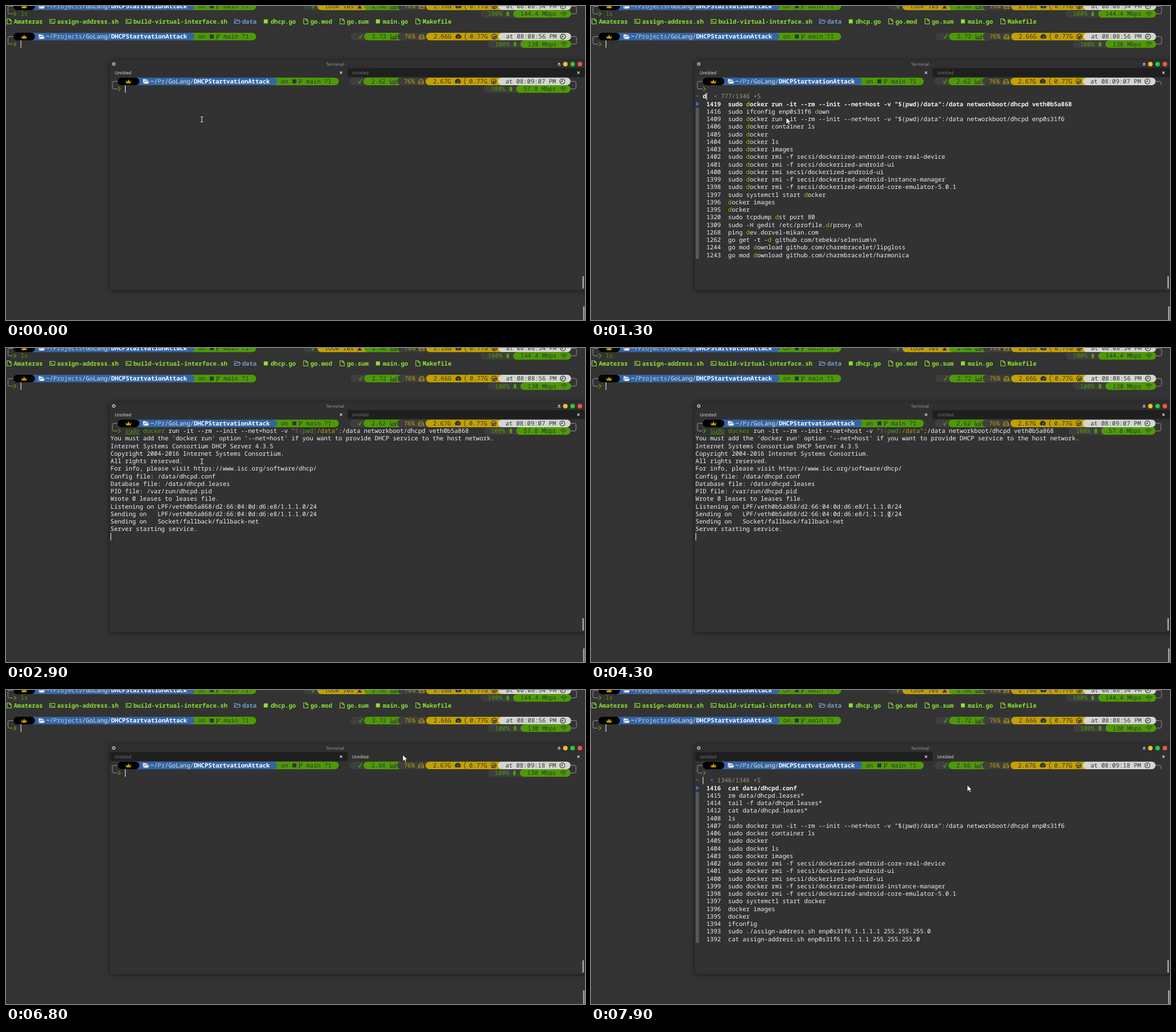
An HTML page for the animation above (8 s loop, 1017 by 551 pixels).

```html
<!DOCTYPE html>
<html lang="en">
<head>
<meta charset="utf-8">
<title>Terminal</title>
<style>
html, body { margin: 0; width: 100%; height: 100%; overflow: hidden; background: #333; }
svg { display: block; width: 1017px; height: 551px; }
text { font: 10.605px "Noto Sans Mono", "DejaVu Sans Mono", monospace; fill: #f2f2f2; white-space: pre; text-rendering: geometricPrecision; }
.ui { font: 7.7px "Noto Sans", "Open Sans", sans-serif; }
.b { font-weight: 700; }
.u { text-decoration: underline; }
</style>
</head>
<body>
<svg id="stage" viewBox="0 0 1017 551"></svg>
<script>
const CW = 6.363, RH = 13.25, LOOP = 8000;
const GREEN = '#4e9a06', GOLD = '#c4a000', BLUE = '#3465a4', DARK = '#2e3436',
      GREY = '#3e3e3e', PALE = '#d3d7cf', LIME = '#8ae234', SKY = '#729fcf', LINE = '#949494';

// Drawing helpers; rows and columns are terminal cells.
const text = (col, row, str, fill = '#f2f2f2', cls = '') =>
  `<text x="${col * CW}" y="${row * RH + 10.3}" style="fill:${fill}" class="${cls}">${str}</text>`;
const span = (str, fill, cls = '') => `<tspan style="fill:${fill}" class="${cls}">${str}</tspan>`;
const rect = (x, y, w, h, fill, rx = 0) =>
  `<rect x="${x}" y="${y}" width="${w}" height="${h}" rx="${rx}" fill="${fill}"/>`;
const pill = (x1, x2, row, fill) => rect(x1, row * RH, x2 - x1, RH, fill, 6.6);
const line = (d, stroke = LINE, width = 1) =>
  `<path d="${d}" fill="none" stroke="${stroke}" stroke-width="${width}"/>`;
const caret = (col, row) => rect(col * CW, row * RH, 1, RH, '#fff');
const group = (x, y, body, id = '') => `<g ${id && `id="${id}"`} transform="translate(${x} ${y})">${body}</g>`;
const layer = (id, body) => `<g id="${id}">${body}</g>`;

const solid = {
  crown: 'M-5-2L-2.5 1L0-3.5L2.5 1L5-2L4 3.5H-4Z',
  folder: 'M-5.5 4V-4H-2L-1-3H3V-1H-3ZM-4.8 4L-2.5 0H5.5L3.5 4Z',
  glass: 'M-4.5 4H4.5L1.5 0L3-4H-3L-1.5 0Z',
  gauge: 'M-4 3.5A5 5 0 1 1 4 3.5ZM0 2L2.5-2L-1 1Z',
  battery: 'M-2-3H-1V-4.5H1V-3H2.3V4H-2.3V-3Z',
  square: 'M-3.5-3.5H3.5V3.5H-3.5Z'
};
const outline = {
  branch: 'M-2-4V4M2-4V-1.5Q2 .5-2 1.5M1-3H3M-3-3H-1M-3 4H-1',
  check: 'M-3 0L-1 3L3-4',
  bars: 'M-5-4V4H5.5M-2.5 3V0M0 3V-2M2.5 3V-1M4.7 3V-4',
  disk: 'M-2.5-3H2.5L4.5 1V4H-4.5V1ZM-4.5 1H4.5',
  ram: 'M0-4.5A4.5 4.5 0 1 1-.01-4.5M-1.5 4V-.5H3.5M0 4V1H3.5',
  clock: 'M0-4.5A4.5 4.5 0 1 1-.01-4.5M0-3V.5H-3',
  wifi: 'M-5.5-1Q0-6 5.5-1M-3.5 1.2Q0-2 3.5 1.2M-1.3 3.3H1.3',
  file: 'M-3.5-4.5H1L4-1.5V4.5H-3.5ZM1-4.5V-1.5H4',
  term: 'M-4.5-3.5H4.5V3.5H-4.5ZM-3-1.5L-1 0L-3 1.5M0 2H3',
  open: 'M-5 3.5V-3.5H-1.5L-.5-2.5H3.5V-.5M-5 3.5L-2.5-.5H5.5L3.5 3.5Z',
  prompt: 'M-2-3.7L1.4 0L-2 3.7'
};
const icon = (name, x, row, color) => group(x, (row + .5) * RH, solid[name]
  ? `<path d="${solid[name]}" fill="${color}"/>` : line(outline[name], color, name === 'prompt' || name === 'check' ? 1.5 : 1.1));

// Two-line shell prompt: info bar, then the second line's left and right parts.
function infoBar({ dir, load, mem, time, took, shift = 0 }) {
  const end = 11 + 2 + dir.length + 8 + 21, x = end * CW;
  const path = span('~', '#eee', 'b') + span('/', '#e4e4e4') + span(dir, '#bccbdc') +
    span('/GoLang/', '#e4e4e4') + span('DHCPStartvationAttack', '#fff', 'b');
  const check = took ? 337.4 : 420.4;
  return line('M3.2 13.25V9Q3.2 6.6 5.6 6.6H13') +
    pill(x, x + 19 * CW, 0, GREEN) + pill(40, x + 12.7, 0, BLUE) + rect(40, 0, 12, RH, BLUE) +
    pill(12.7, 50.6, 0, '#000') + icon('crown', 31.5, 0, GOLD) + icon('folder', 62.5, 0, '#eee') +
    text(11, 0, path) + text(end + 3, 0, 'on', DARK) + icon('square', x + 43, 0, DARK) +
    icon('branch', x + 54, 0, DARK) + text(end + 10, 0, 'main ?1', DARK) +
    group(shift, 0,
      pill(check, 458, 0, GREY) + icon('check', check + 18, 0, GREEN) +
      (took ? pill(362.4, 458, 0, GOLD) + text(59, 0, took, DARK) + icon('glass', 436.5, 0, DARK) : '') +
      pill(444.4, 517, 0, GREEN) + text(72, 0, load, DARK) + icon('bars', 496.4, 0, DARK) +
      pill(503.4, 567, 0, GREY) + text(81, 0, '76%', GOLD) + icon('disk', 545.4, 0, GOLD) +
      pill(553.4, 694, 0, GOLD) + text(89, 0, mem, DARK) + icon('gauge', 610, 0, DARK) +
      line('M624 .5Q619 6.6 624 12.7', DARK) + text(99, 0, '0.77G', DARK) + icon('ram', 673, 0, DARK) +
      pill(680.4, 808, 0, PALE) + text(109, 0, 'at ' + time + ' PM', DARK) + icon('clock', 793.6, 0, DARK) +
      line('M808 6.6H815Q817.5 6.6 817.5 9V13.25'));
}
const inputLine = () => line('M3.2 13.25V17.5Q3.2 19.9 5.6 19.9H12.7') + icon('prompt', 15.7, 1, GREEN);
function netBar(speed, shift = 0) {
  const col = 118 - speed.length, x = col * CW;
  return group(shift, 0,
    pill(x - 11 * CW, x, 1, GREY) + text(col - 9, 1, '100%', GREEN) + icon('battery', x - 3.5 * CW, 1, GREEN) +
    pill(x - 2 * CW, 808, 1, GREEN) + text(col, 1, speed + ' Mbps', DARK) + icon('wifi', 795.4, 1, DARK) +
    line('M817.5 13.25V17.4Q817.5 19.9 815 19.9H808'));
}

// Fuzzy history search
const run = 'sudo docker run -it --rm --init --net=host -v "$(pwd)/data":/data networkboot/dhcpd ';
const common = `1406 sudo docker container ls
1405 sudo docker
1404 sudo docker ls
1403 sudo docker images
1402 sudo docker rmi -f secsi/dockerized-android-core-real-device
1401 sudo docker rmi -f secsi/dockerized-android-ui
1400 sudo docker rmi secsi/dockerized-android-ui
1399 sudo docker rmi -f secsi/dockerized-android-instance-manager
1398 sudo docker rmi -f secsi/dockerized-android-core-emulator-5.0.1
1397 sudo systemctl start docker
1396 docker images
1395 docker`;
const older = `1394 ifconfig
1393 sudo ./assign-address.sh enp0s31f6 1.1.1.1 255.255.255.0
1392 cat assign-address.sh enp0s31f6 1.1.1.1 255.255.255.0`;
const recent = `1420 ls
1419 ${run}veth0b5a868
1418 ifconfig
1416 sudo ifconfig enp0s31f6 down
1409 ${run}enp0s31f6
1408 ls
${common}
${older}`;
const matches = `1419 ${run}veth0b5a868
1416 sudo ifconfig enp0s31f6 down
1409 ${run}enp0s31f6
${common}
1320 sudo tcpdump dst port 80
1309 sudo -H gedit /etc/profile.d/proxy.sh
1268 ping dev.dorvel-mikan.com
1262 go get -t -d github.com/tebeka/selenium\\n
1244 go mod download github.com/charmbracelet/lipgloss
1243 go mod download github.com/charmbracelet/harmonica`;
const second = `1416 cat data/dhcpd.conf
1415 rm data/dhcpd.leases*
1414 tail -f data/dhcpd.leases*
1412 cat data/dhcpd.leases*
1408 ls
1407 ${run}enp0s31f6
${common}
${older}`;

function search(query, count, list) {
  const n = query.length;
  return text(0, 2, '~', SKY) + text(2, 2, query, '#fff', 'b') + caret(2 + n, 2) +
    text(4 + n, 2, '&lt;', SKY) + text(6 + n, 2, count + '/1346 +S', '#9c9c78') +
    `<path d="M1 ${3.2 * RH}L6.5 ${3.5 * RH}L1 ${3.8 * RH}Z" fill="#3a78bd"/>` +
    rect(.2, 4 * RH, 6, 20 * RH, '#585858') +
    list.split('\n').map((row, i) => {
      const cmd = row.slice(5);
      return text(3, 3 + i, row.slice(0, 4) + '  ' +
        (query ? cmd.replace(/\bd/, span('d', '#a4bd14')) : cmd), '#f2f2f2', i ? '' : 'b');
    }).join('');
}

const command = span('sudo', GREEN, 'u') + ' ' + span('docker', GREEN) + ' run -it --rm --init --net=host -v ' +
  span('"', GOLD) + span('$(', '#75507b') + span('pwd', GREEN) + span(')', '#75507b') + span('/data"', GOLD) +
  ':/data networkboot/dhcpd veth0b5a868';
const output = `You must add the 'docker run' option '--net=host' if you want to provide DHCP service to the host network.
Internet Systems Consortium DHCP Server 4.3.5
Copyright 2004-2016 Internet Systems Consortium.
All rights reserved.
For info, please visit https://www.isc.org/software/dhcp/
Config file: /data/dhcpd.conf
Database file: /data/dhcpd.leases
PID file: /var/run/dhcpd.pid
Wrote 0 leases to leases file.
Listening on LPF/veth0b5a868/d2:66:04:0d:d6:e8/1.1.1.0/24
Sending on   LPF/veth0b5a868/d2:66:04:0d:d6:e8/1.1.1.0/24
Sending on   Socket/fallback/fallback-net
Server starting service.`.split('\n').map((s, i) => text(0, 2 + i, s)).join('');
const selection = [...'1.1.1.0'].map((c, i) =>
  layer('sel' + i, rect((47 + i) * CW, 11 * RH, CW + .1, RH, '#fff') + text(47 + i, 11, c, '#222'))).join('');

// Listing in the terminal behind
const files = [['file', 5, 'Amateras'], ['term', 81, 'assign-address.sh'], ['term', 215, 'build-virtual-interface.sh'],
  ['open', 406, 'data'], ['square', 456, 'dhcp.go'], ['file', 526, 'go.mod'], ['file', 590, 'go.sum'],
  ['square', 653, 'main.go'], ['file', 723, 'Makefile']];
const listing = files.map(([kind, x, name]) => {
  const color = kind === 'open' ? SKY : LIME;
  return icon(kind, x, 2, color) + text((x + 8.4) / CW, 2, name, color, 'b');
}).join('');

const tab = (x, active) => rect(x, 109, 417, 15.5, active ? '#303030' : '#1f1f1f') +
  `<text class="ui" x="${x + 8}" y="119.7" style="fill:${active ? '#ddd' : '#777'}">Untitled</text>` +
  line(`M${x + 403.5} 115l4 4m0-4l-4 4`, '#ccc', 1.2);
const dot = (x, color) => `<circle cx="${x}" cy="102" r="4" fill="${color}"/>`;
const frame = `<g style="filter:drop-shadow(0 1px 4px rgba(0,0,0,.55))">${rect(182.5, 95, 840, 403.5, '#323232', 3)}</g>` +
  rect(183, 95.5, 834, 14, '#2f2f2f') +
  `<circle cx="189.3" cy="101.8" r="2.2" fill="none" stroke="#bbb" stroke-width="1.6"/>` +
  `<text class="ui" x="562" y="104.7" style="fill:#9a9a9a">Terminal -</text>` +
  `<path d="M969 102L971.5 99L974 102ZM969 103H974V104.2H969Z" fill="#ccc"/>` +
  dot(982.5, '#f5bd2f') + dot(995.2, '#28c840') + dot(1008, '#f2524a') +
  rect(1012.5, 474, 2.5, 22, '#aaa', 1.2);

const back = group(.3, -6.1, infoBar({ dir: 'Projects', load: '2.66', mem: '2.18G', time: '08:08:34', took: 'took 10s', shift: 184.3 }) +
    inputLine() + text(4, 1, 'ls', GREEN) + netBar('144.4', 184.3) + listing) +
  group(.3, 47, infoBar({ dir: 'Projects', load: '2.72', mem: '2.66G', time: '08:08:56', shift: 184.3 }) +
    inputLine() + netBar('130', 184.3) + caret(4, 1)) + rect(1013.7, 527, 2.5, 24, '#aaa', 1.2);

const shell = layer('first', infoBar({ dir: 'Pr', load: '2.62', mem: '2.67G', time: '08:09:07' })) +
  layer('next', infoBar({ dir: 'Pr', load: '2.66', mem: '2.67G', time: '08:09:18' })) + inputLine() +
  layer('net1', netBar('57.8')) + layer('net2', netBar('130')) + layer('idle', caret(4, 1)) +
  layer('found', search('', '1346', recent)) + layer('typed', search('d', '777', matches)) +
  layer('fresh', search('', '1346', second)) +
  layer('cmd', text(4, 1, command)) + layer('cmdCaret', caret(99, 1)) +
  layer('out', output + caret(0, 15)) + selection;

const beam = 'M-2.5-4.5Q0-4.5 0-3.5Q0-4.5 2.5-4.5M0-4V4M-2.5 4.5Q0 4.5 0 3.5Q0 4.5 2.5 4.5';
const pointer = layer('pointer',
  layer('beam', line(beam, '#222', 2.2) + line(beam, '#fff')) +
  layer('arrow', '<path d="M-1-3V8L1.7 5.6L3.5 9.6L5.3 8.8L3.5 5H7Z" fill="#fff" stroke="#222" stroke-width=".7"/>'));

document.getElementById('stage').innerHTML = back + frame +
  layer('tabs1', tab(183, true) + tab(600, false)) + layer('tabs2', tab(183, false) + tab(600, true)) +
  group(183.6, 125.65, shell) + pointer;

// Timeline
let css = '';
const animate = (id, prop, steps) => {
  css += `@keyframes ${id}{${steps.map(([ms, v]) => `${ms / LOOP * 100}%{${prop}:${v}}`).join('')}}` +
    `#${id}{animation:${id} ${LOOP}ms step-end infinite}`;
};
const show = (id, ...spans) => {
  const steps = spans[0][0] ? [[0, 'hidden']] : [];
  for (const [from, to] of spans) {
    steps.push([from, 'visible']);
    steps.push([to, to < LOOP ? 'hidden' : 'visible']);
  }
  animate(id, 'visibility', steps);
};
const SWITCH = 6700;
show('tabs1', [0, SWITCH]);
show('first', [0, SWITCH]);
show('tabs2', [SWITCH, LOOP]);
show('next', [SWITCH, LOOP]);
show('net1', [0, 500], [2300, SWITCH]);
show('net2', [SWITCH, 7900]);
show('idle', [0, 500], [SWITCH, 7900]);
show('found', [500, 1300]);
show('typed', [1300, 2300]);
show('cmd', [2300, SWITCH]);
show('cmdCaret', [2300, 2900]);
show('out', [2900, SWITCH]);
show('fresh', [7900, LOOP]);
for (let i = 0; i < 7; i++) show('sel' + i, [4900 + 100 * Math.floor((6 - i) * .9), SWITCH]);
show('beam', [0, 500], [2300, 6500], [7000, 7900]);
show('arrow', [500, 2300], [6500, 7000], [7900, LOOP]);

// Pointer legs: start time, then one place per 100 ms.
const legs = [
  [0, 344, 199],
  [3700, 337, 206, 345, 238, 378, 290, 440, 330, 510, 340, 540, 318, 524, 292, 526, 287, 526, 284],
  [4600, 526, 281, 526, 279],
  [4900, 521, 279, 514, 279, 506, 279, 499, 279, 491, 279, 484, 280],
  [5800, 574, 301, 645, 302, 690, 298],
  [6200, 704, 270, 716, 222, 716, 165, 708, 128, 702, 117, 700, 116, 698, 117, 690, 121, 679, 131],
  [7100, 665, 160, 662, 170]
];
animate('pointer', 'transform', legs.flatMap(([start, ...p]) =>
  p.flatMap((x, i) => i % 2 ? [] : [[start + i * 50, `translate(${x}px,${p[i + 1]}px)`]])));
document.head.append(Object.assign(document.createElement('style'), { textContent: css }));
</script>
</body>
</html>
```
